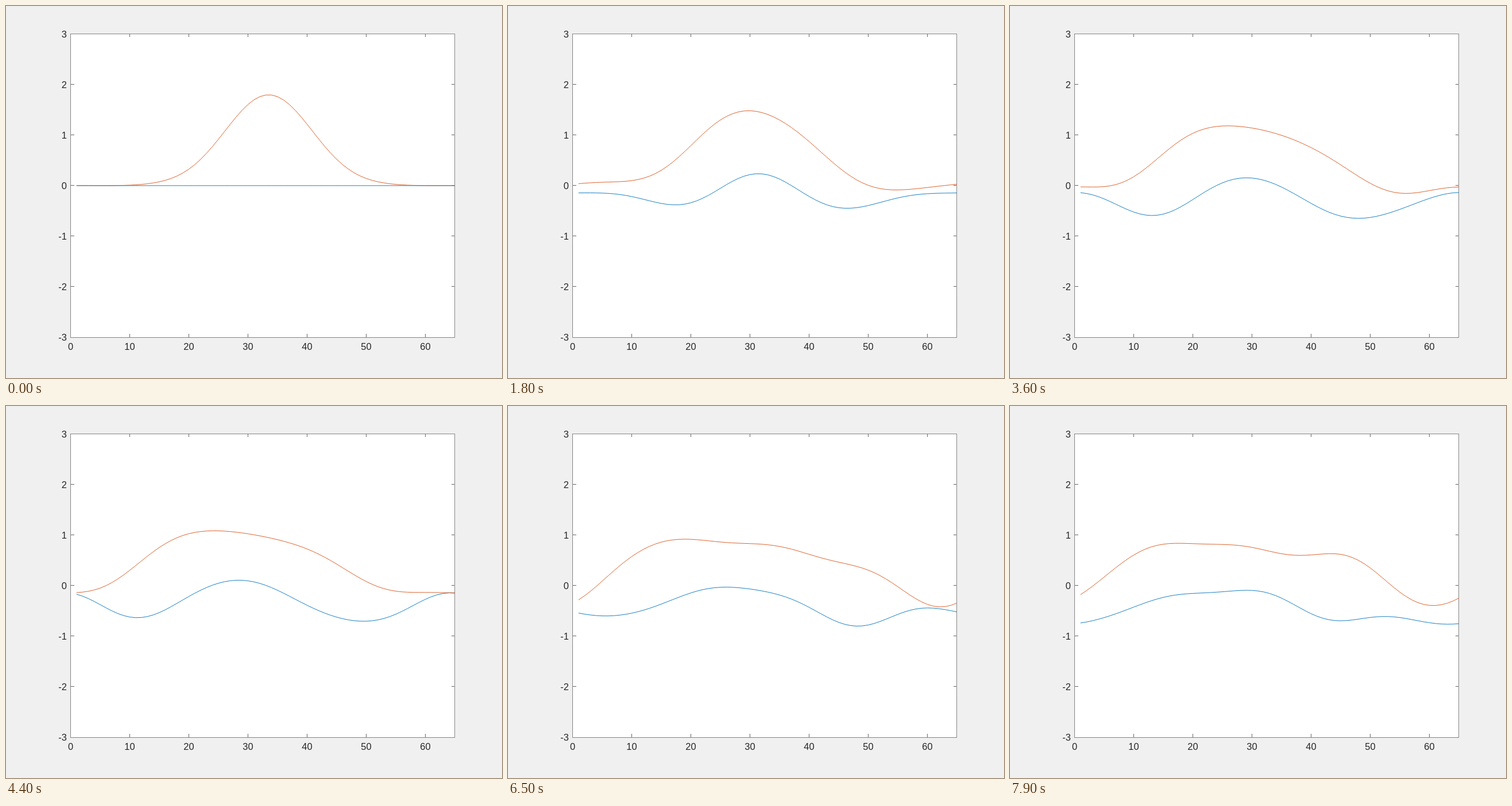
These frames come from a looping animation (864 px wide and 648 px high, 8000 ms). An HTML page:

```html
<!DOCTYPE html>
<html lang="en">
<head>
<meta charset="utf-8">
<title>Two waves</title>
<style>
  html, body { margin: 0; width: 100%; height: 100%; overflow: hidden; background: #f0f0f0; }
  svg { display: block; }
  text { font: 16.5px "Liberation Sans", Arial, sans-serif; fill: #262626; }
  .box { fill: #fff; stroke: #262626; stroke-width: .55; }
  .tick { stroke: #666; }
  .wave { fill: none; stroke-width: .9; stroke-linejoin: round; }
</style>
</head>
<body>
<svg id="plot" width="864" height="648" viewBox="0 0 864 648"></svg>
<script>
const LOOP = 8000, STEP = 100, CELLS = 65;
const px = x => 112.5 + 10.3 * x;
const py = y => 312.9 - 88 * y;

const svg = document.getElementById('plot');
function add(tag, attrs, text = '') {
  const el = document.createElementNS('http://www.w3.org/2000/svg', tag);
  for (const key in attrs) el.setAttribute(key, attrs[key]);
  el.textContent = text;
  return svg.appendChild(el);
}

// A Gaussian on a ring, split into harmonics k = -4..4. Each one turns at a rate
// of k squared, settles into a phase lag, and grows or fades by its gain per loop.
const PEAK = 1.8, CENTRE = 33.5, SPREAD = 107;
const BASE = 2 * Math.PI / CELLS, DEG = Math.PI / 180;
const MEAN = PEAK * Math.sqrt(Math.PI * SPREAD) / CELLS;
const gains = [.1, .12, .48, .855, 1.22, .69, .85, 1.33, 2.5];

function harmonics(t) {
  return gains.map((gain, i) => {
    const k = i - 4;
    const lag = k > 0 ? (18 + 5 * k) * (1 - Math.exp(-t / 1.2))
                      : (9 * k - 55) * (1 - Math.exp(-t / 4));
    return {
      k: k * BASE,
      size: MEAN * Math.exp(-((k * BASE) ** 2) * SPREAD / 4) * gain ** (t / 8),
      phase: (6 * k * k * t + lag) * DEG
    };
  });
}

// part is Math.cos for the real field and Math.sin for the imaginary one
function points(waves, part) {
  return Array.from({ length: CELLS }, (_, i) => {
    const x = i + 1;
    const y = waves.reduce(
      (sum, w) => sum + w.size * part(w.k * (x - CENTRE) + w.phase), 0);
    return px(x).toFixed(2) + ',' + py(y).toFixed(2);
  }).join(' ');
}

add('rect', { class: 'box', x: 112.7, y: 48.8, width: 669.1, height: 528.6 });
const tick = d => add('path', { class: 'tick', d });
for (let x = 0; x <= 60; x += 10) {
  const at = Math.floor(px(x)) + .5;
  if (x) tick(`M${at} 49v5M${at} 577v-6`);
  add('text', { x: px(x), y: 599.3, 'text-anchor': 'middle' }, x);
}
for (let y = -3; y <= 3; y++) {
  const at = Math.floor(py(y)) + .5;
  if (Math.abs(y) < 3) tick(`M113 ${at}h6M781 ${at}h-5`);
  add('text', { x: 106, y: py(y) + 6.3, 'text-anchor': 'end' }, y);
}

const blue = add('polyline', { class: 'wave', stroke: '#0072bd' });
const red = add('polyline', { class: 'wave', stroke: '#d95319' });

function draw(now) {
  const t = Math.floor(now % LOOP / STEP) * STEP / 1000;
  const waves = harmonics(t);
  blue.setAttribute('points', points(waves, Math.sin));
  red.setAttribute('points', points(waves, Math.cos));
  requestAnimationFrame(draw);
}
draw(0);
</script>
</body>
</html>
```
